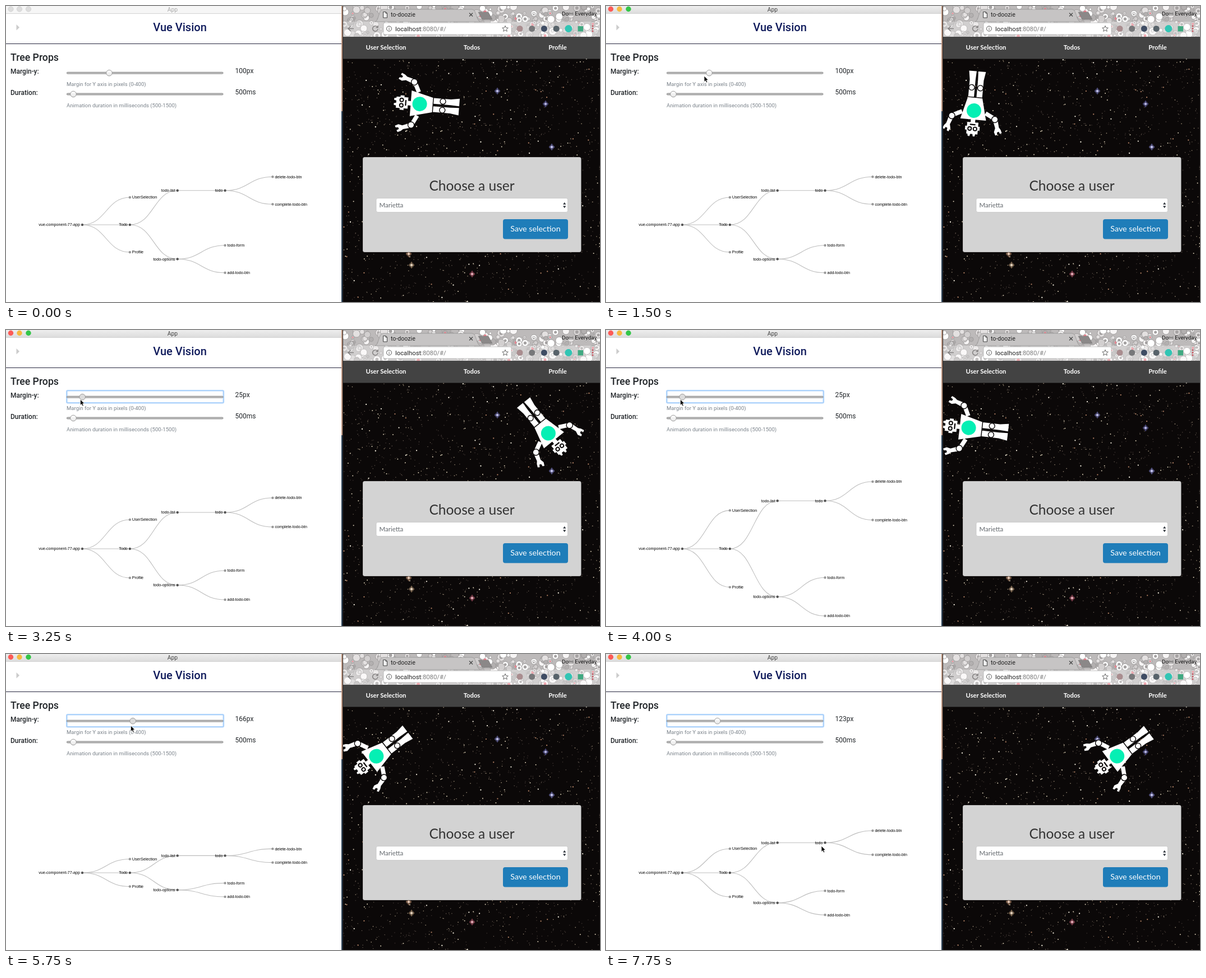
Write an HTML page that moves like this. It is 1059 by 529 pixels and loops after 8000 ms.

```html
<!DOCTYPE html>
<html lang="en">
<head>
<meta charset="utf-8">
<title>Vue Vision</title>
<style>
html, body { margin: 0; width: 100%; height: 100%; overflow: hidden; background: #fff; }
svg { display: block; width: 1059px; height: 529px; }
.ui { font-family: Roboto, sans-serif; }
.page { font-family: Lato, sans-serif; }
.tree text { font: 7.15px "Liberation Sans", Arial, sans-serif; }
.tree path { fill: none; stroke: #bdbdbd; stroke-width: 1.1; }
.label { font-size: 12px; font-weight: 500; fill: #212529; }
.value { font-size: 12px; fill: #212529; }
.hint { font-size: 9.55px; fill: #7b838b; }
.nav { font-size: 11.2px; font-weight: 700; fill: #fff; text-anchor: middle; }
</style>
</head>
<body>
<svg id="stage" viewBox="0 0 1059 529" xmlns="http://www.w3.org/2000/svg"></svg>
<script>
const LOOP = 8000, STEP = 250;
const stage = document.getElementById('stage');

function seeded(seed) {
  return () => (seed = (seed * 16807) % 2147483647) / 2147483647;
}

// Linear interpolation through [time, value, value...] rows
function at(keys, t, col = 1) {
  let i = 0;
  while (i < keys.length - 1 && keys[i + 1][0] <= t) i++;
  const a = keys[i], b = keys[i + 1];
  if (!b || t <= a[0]) return a[col];
  return a[col] + (b[col] - a[col]) * (t - a[0]) / (b[0] - a[0]);
}

const rect = (x, y, w, h, fill, more = '') =>
  `<rect x="${x}" y="${y}" width="${w}" height="${h}" fill="${fill}" ${more}/>`;
const disc = (x, y, r, fill, more = '') =>
  `<circle cx="${x}" cy="${y}" r="${r}" fill="${fill}" ${more}/>`;
const text = (x, y, str, more = '') => `<text x="${x}" y="${y}" ${more}>${str}</text>`;

function sky() {
  const rnd = seeded(4711);
  const layers = [['#3c332f', 1.6, 800], ['#75685c', 1.4, 520], ['#a5957d', 1.6, 260],
                  ['#d2c6ae', 2, 120], ['#f3ecdd', 2.3, 50], ['#b07f62', 2.3, 40]];
  let out = rect(601, 94, 458, 435, '#0b0808');
  for (const [color, width, count] of layers) {
    let d = '';
    for (let i = 0; i < count; i++)
      d += `M${(601 + rnd() * 458).toFixed(1)} ${(94 + rnd() * 435).toFixed(1)}h.01`;
    out += `<path d="${d}" stroke="${color}" stroke-width="${width}" stroke-linecap="round"/>`;
  }
  const bright = [[876, 152, '#8d8ee0'], [962, 175, '#7f7fd6'], [973, 252, '#9b9af0'],
                  [831, 479, '#d86a80'], [723, 463, '#d8b48c'], [718, 443, '#d9a27e']];
  for (const [x, y, color] of bright)
    out += disc(x, y, 4.5, color, 'opacity=".35"') + disc(x, y, 2.1, '#fff') +
      `<path d="M${x - 5} ${y}h10M${x} ${y - 6}v12" stroke="${color}" stroke-width=".8"/>`;
  return out;
}

function browserBar() {
  const rnd = seeded(90);
  const tones = ['#f7f5f5', '#e4e1e1', '#b3b0b0', '#d2cfcf', '#fff'];
  let out = rect(601, 0, 458, 55, '#bdbaba');
  for (let i = 0; i < 330; i++) {
    const x = (601 + rnd() * 458).toFixed(1), y = (rnd() * 55).toFixed(1), r = 2 + rnd() * 5;
    out += disc(x, y, r.toFixed(1), tones[Math.floor(rnd() * 5)], 'stroke="#999696" stroke-width=".8"');
    const core = rnd();
    if (core < .4) out += disc(x, y, (r * .45).toFixed(1), core < .1 ? '#e8848f' : '#a5a2a2');
  }
  out += rect(601, 28, 458, 27, '#fff', 'opacity=".3"');
  out += '<path d="M658 28C665 27 664 6 672 6H831C839 6 838 27 846 28Z" fill="#c6c4c4" stroke="#8f8d8d" stroke-width=".7"/>';
  out += '<path d="M842 11h18l7 13h-18z" fill="#8b8888" stroke="#777" stroke-width=".6"/>';
  out += '<path d="M672.5 10.5h4.500l2.500 2.500v8h-7zM677 10.500v2.500h2.500" fill="#eee" stroke="#444"/>';
  out += text(686, 19, 'to-doozie', 'font-size="10.6" fill="#222"');
  out += '<path d="M826 12.500l6 6m0-6l-6 6" stroke="#444" stroke-width="1.2"/>';
  out += text(991, 16.5, 'Dom Everyday', 'font-size="9.9" fill="#111"');
  out += '<g fill="none" stroke="#858282" stroke-width="1.5"><path d="M620 40.500h-10m4.500-4.500l-4.500 4.500 4.500 4.500"/><path d="M662 37.500a4.700 4.700 0 1 0 1 3.500m0-6v3.500h-3.500"/></g>';
  out += rect(673, 30, 228, 21, '#fff', 'rx="2.5" stroke="#aaa" stroke-width=".7"');
  out += disc(683, 40.5, 4.5, 'none', 'stroke="#555"') +
    '<path d="M683 39.800v3m0-5v1" stroke="#555"/>';
  out += text(694, 44.5, 'localhost<tspan fill="#7b7b7b">:8080/#/</tspan>', 'font-size="11.3" fill="#222"');
  out += '<path d="M890 35.300l1.500 3.500 3.800.3-2.900 2.500.9 3.700-3.300-2-3.300 2 .9-3.700-2.900-2.500 3.800-.3z" fill="none" stroke="#666"/>';
  const dots = ['#a98d8f', '#77787a', '#3f4c63', '#58636a', '#31c5b4'];
  dots.forEach((color, i) => out += disc(916 + i * 21.7, 40.5, i === 4 ? 6.5 : 5.5, color));
  out += rect(1019.5, 36, 9.5, 9.5, '#41a982');
  [36, 40.5, 45].forEach(y => out += disc(1046, y, 1.4, '#c8505c'));
  return `<g class="ui">${out}</g>`;
}

function card() {
  return rect(601, 55, 458, 39.5, '#434343') +
    text(677.5, 78.3, 'User Selection', 'class="nav"') +
    text(830.5, 78.3, 'Todos', 'class="nav"') +
    text(983.5, 78.3, 'Profile', 'class="nav"') +
    rect(636, 270, 389.5, 170, '#b8b8b8', 'rx="3.5"') +
    rect(636.7, 270.7, 388.1, 168.6, '#d3d3d3', 'rx="3"') +
    text(830.5, 329.8, 'Choose a user', 'font-size="24.5" fill="#333" text-anchor="middle"') +
    rect(660, 343.5, 341.5, 25, '#fff', 'rx="3" stroke="#c6c6c6" stroke-width=".8"') +
    text(665.5, 359.5, 'Marietta', 'font-size="11.5" fill="#63686d"') +
    '<path d="M993 354.800l2.700-4 2.700 4zM993 357.200l2.700 4 2.700-4z" fill="#343a40"/>' +
    rect(886, 381, 116, 35.5, '#1f7db9', 'rx="4"') +
    text(944, 403, 'Save selection', 'font-size="14.3" fill="#fff" text-anchor="middle"');
}

function robot() {
  const ink = 'stroke="#0a0707" stroke-width="1.4"';
  const side = `<path d="M21 -14L37 -22" stroke="#fff" stroke-width="7.5"/>
    <path d="M35 -25L40.500 -39 39 -46 42 -52 45 -50.500 44.500 -46 47.500 -44.500 50 -48.500 53 -46.500 50.500 -41 47 -37 43 -22Z" fill="#fff"/>
    <path d="M2.200 13.500H12.500V44L15 59.500H1.500L2.200 44Z" fill="#fff"/>
    ${disc(38.5, -23.5, 5.6, '#fff', ink)}${disc(7.8, 30, 5, '#fff', ink)}`;
  const eye = x => disc(x, -43.5, 3.1, '#fff', 'stroke="#0a0707" stroke-width="1.9"');
  return `<g id="robot">${side}<g transform="scale(-1 1)">${side}</g>
    <path d="M-23 -27H23L13 12H-13Z" fill="#fff"/>${disc(0, -11, 13, '#05efb4')}
    <path d="M-4 -34H4V-26H-4ZM-10 -53H-6L-5 -57H-2L-1 -53H3L4 -57H7L8 -53H10V-32H-10ZM-13 -46H-10V-39H-13ZM10 -46H13V-39H10Z" fill="#fff"/>
    ${eye(-4.8)}${eye(4.8)}<path d="M-5 -36H5" stroke="#0a0707" stroke-width="2.2"/></g>`;
}

function slider(y, id) {
  return rect(108.4, y - 1.4, 278.6, 2.8, '#c4c4c4', 'rx="1.4" stroke="#7c7c7c" stroke-width=".9"') +
    disc(120, y, 5.3, 'url(#knob)', `id="${id}" stroke="#949494" stroke-width=".9"`);
}

// name, parent, depth, vertical place in sibling gaps, has children
const NODES = [
  ['vue-component-77-app', -1, 0, 0, 1], ['UserSelection', 0, 1, -1, 0], ['Todo', 0, 1, 0, 1],
  ['Profile', 0, 1, 1, 0], ['todo-list', 2, 2, -1.25, 1], ['todo-options', 2, 2, 1.25, 1],
  ['todo', 4, 3, -1.25, 1], ['delete-todo-btn', 6, 4, -1.75, 0], ['complete-todo-btn', 6, 4, -.75, 0],
  ['todo-form', 5, 3, .75, 0], ['add-todo-btn', 5, 3, 1.75, 0]
];
const nodeX = n => 136 + n[2] * 84.85;

function tree(gap) {
  const y = n => 391 + n[3] * gap;
  let links = '', marks = '';
  for (const n of NODES) {
    const x = nodeX(n), p = NODES[n[1]];
    if (p) {
      const px = nodeX(p), mid = (x + px) / 2;
      links += `<path d="M${px} ${y(p)}C${mid} ${y(p)} ${mid} ${y(n)} ${x} ${y(n)}"/>`;
    }
    marks += disc(x, y(n), 2.2, n[4] ? '#555' : '#999') +
      text(n[4] ? x - 4 : x + 4, y(n) + 2.4, n[0], n[4] ? 'text-anchor="end"' : '');
  }
  return links + marks;
}

function panel() {
  return `<g class="ui">` + rect(0, 0, 598, 529, '#fff') +
    rect(598, 0, 3, 188, '#b98f78') + rect(598, 188, 3, 341, '#22384d') + rect(600, 0, 1, 529, '#2a2a2c') +
    rect(0, 0, 598, 13, '#f6f6f6', 'id="bar"') + rect(0, 13, 598, .8, '#c9c9c9') +
    [8.5, 24, 40].map(x => disc(x, 5.5, 4.7, '#ddd', 'class="light" stroke-width=".6"')).join('') +
    text(297, 10, 'App', 'font-size="10.3" text-anchor="middle" id="app"') +
    '<path d="M18.500 33l5.500 5.300-5.500 5.300z" fill="#ccc"/>' +
    text(310, 45, 'Vue Vision', 'font-size="20" font-weight="500" text-anchor="middle" fill="#101b5c"') +
    rect(0, 67, 598, 1, '#24243c') +
    text(8, 98, 'Tree Props', 'font-size="17.7" font-weight="500" fill="#212529"') +
    text(8, 120.5, 'Margin-y:', 'class="label"') + text(8, 158.5, 'Duration:', 'class="label"') +
    rect(108.3, 108.3, 279.5, 22, '#fff', 'id="ring" rx="2" stroke="#aed3fb" stroke-width="2.6"') +
    slider(119.7, 'knob1') + slider(157.5, 'knob2') +
    text(108, 143, 'Margin for Y axis in pixels (0-400)', 'class="hint"') +
    text(108, 181, 'Animation duration in milliseconds (500-1500)', 'class="hint"') +
    text(408.5, 120.3, '', 'class="value" id="margin"') + text(408.5, 158.3, '500ms', 'class="value"') +
    '</g><g class="tree" id="tree"></g>';
}

stage.innerHTML = `<defs>
  <linearGradient id="knob" x2="0" y2="1"><stop stop-color="#fff"/><stop offset="1" stop-color="#e6e6e6"/></linearGradient>
  <linearGradient id="active" x2="0" y2="1"><stop stop-color="#eeeeee"/><stop offset="1" stop-color="#dcdcdc"/></linearGradient>
  </defs>` + sky() + robot() + browserBar() + `<g class="page">${card()}</g>` + panel() +
  `<path id="cursor" d="M0 0V10.500L2.400 8.400 4 12 5.900 11.200 4.300 7.600H7.500Z" fill="#000" stroke="#fff" stroke-width=".8"/>`;

const $ = id => document.getElementById(id);
const lights = [...document.querySelectorAll('.light')];
const lit = ['#fc5b57', '#f6b93f', '#34c648'];

const ROBOT_X = [[0, 748.5], [.5, 925], [.75, 966], [1, 945], [1.25, 760], [1.5, 657], [2, 652],
  [2.25, 715], [2.75, 890], [3, 968], [3.25, 960], [3.5, 780], [3.75, 660], [4.25, 655],
  [4.75, 793], [5, 964], [5.25, 955], [5.5, 790], [5.75, 669], [6.15, 650], [6.5, 662],
  [7, 800], [7.25, 915], [7.5, 967], [7.75, 920], [8, 748.5]];
const MARGIN = [[2.5, 100], [3, 42], [3.25, 25], [4, 25], [4.75, 194], [5.5, 194], [5.75, 166], [6, 123]];
const GAP = [[2.75, 49], [3, 49.4], [3.25, 52], [3.5, 64], [3.75, 68.6], [4.25, 68.6], [4.5, 66.5],
  [4.75, 56.3], [5, 35], [5.25, 24.5], [5.75, 24.5], [6, 31], [6.25, 40.3], [6.5, 43]];
const POINTER = [[.25, 540, 222], [.75, 330, 165], [1.25, 178, 128], [1.5, 175, 125], [2, 180, 125],
  [3.25, 132, 124], [4, 132, 124], [4.75, 241, 128], [6, 195, 128], [6.25, 142, 140],
  [6.5, 137, 153], [7, 235, 262], [7.5, 368, 381], [7.75, 384, 343]];

function draw(ms) {
  const t = Math.floor(ms / STEP) * STEP / 1000;
  const active = t >= 1.5, focused = t >= 1.75, held = focused && t < 6;
  const margin = Math.round(at(MARGIN, t)), knob = 120.2 + margin * .638;

  $('robot').setAttribute('transform', `translate(${at(ROBOT_X, t)} 176) rotate(${-85.5 + 180.5 * t})`);
  $('tree').innerHTML = tree(at(GAP, t));
  $('margin').textContent = margin + 'px';
  $('knob1').setAttribute('cx', knob);
  $('knob1').setAttribute('fill', held ? '#dcdcdc' : 'url(#knob)');
  $('ring').style.display = focused ? '' : 'none';

  $('bar').setAttribute('fill', active ? 'url(#active)' : '#f6f6f6');
  $('app').setAttribute('fill', active ? '#444' : '#aaa');
  lights.forEach((el, i) => {
    el.setAttribute('fill', active ? lit[i] : '#ddd');
    el.setAttribute('stroke', active ? 'none' : '#c8c8c8');
  });

  const drag = t >= 2 && t < 6;
  const x = drag ? knob - 3.7 : at(POINTER, t);
  $('cursor').style.display = t < .25 ? 'none' : '';
  $('cursor').setAttribute('transform', `translate(${x} ${at(POINTER, t, 2)})`);
}

const start = performance.now();
function tick(now) {
  draw(Math.max(0, now - start) % LOOP);
  requestAnimationFrame(tick);
}
draw(0);
requestAnimationFrame(tick);
</script>
</body>
</html>
```
